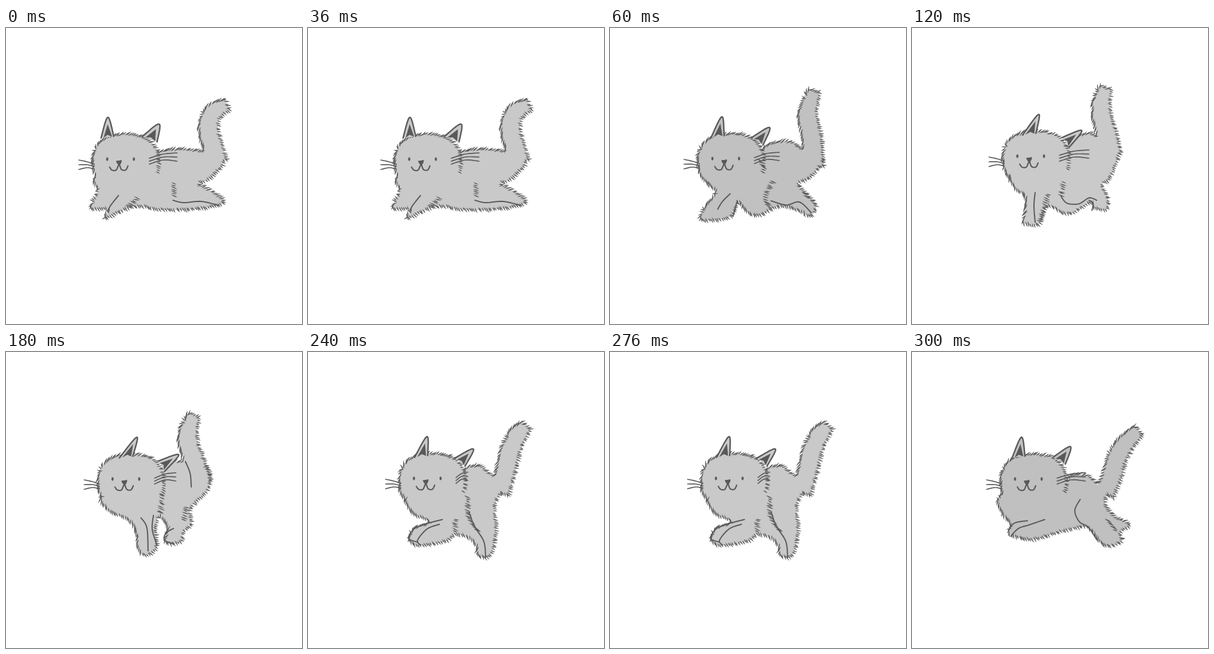
These frames come from a looping animation (500 by 500 pixels, 360 ms). An HTML page with a canvas:

```html
<!DOCTYPE html>
<html lang="en">
<head>
<meta charset="utf-8">
<title>Running cat</title>
<style>
html, body { margin: 0; width: 100%; height: 100%; overflow: hidden; background: #fff; }
canvas { display: block; width: 500px; height: 500px; }
</style>
</head>
<body>
<canvas id="stage" width="500" height="500"></canvas>
<script>
const ctx = document.getElementById('stage').getContext('2d');
const INK = '#595959', STEP = 60, TAIL_R = 16.5;

// Key poses of the run. The head follows from nose and turn, the fur from the outlines.
const poses = [
  {
    fill: '#c9c9c9', nose: [191, 227], turn: -19, reach: 47,
    tail: '358,228 348,196 342,168 350,143 374,129',
    torso: `225,215 262,207 300,204 340,211 368,226 345,254 326,263 342,272 368,290 360,299
      320,306 265,307 222,301 195,309 166,322 172,306 143,304 155,273 152,250`,
    lines: ['282,291 300,295 330,293 360,300', '190,283 178,298 172,308'],
    tufts: ['284,262 284,287', '222,288 205,303']
  },
  {
    fill: '#c1c1c1', nose: [193, 226], turn: -4, reach: 42,
    tail: '345,235 342,195 337,165 334,140 345,106',
    torso: `250,210 266,198 290,191 312,194 334,214 360,222 338,253 318,263 335,283 348,300 338,318
      318,308 286,301 250,317 230,309 216,294 203,319 156,325 156,308 178,278 170,255`,
    lines: ['272,292 298,299 320,294 340,312', '203,280 190,293 182,306', '215,292 208,318'],
    tufts: ['275,260 263,284 270,306', '254,224 262,240', '328,278 336,288']
  },
  {
    fill: '#cacaca', nose: [198, 222], turn: 16, reach: 50,
    tail: '338,215 328,175 321,150 320,125 327,100',
    torso: `250,210 270,190 300,177 324,195 350,205 335,253 322,265 332,290 328,307 309,304
      301,295 265,314 229,301 217,329 208,333 188,328 192,305 190,284 172,268 170,240`,
    lines: ['208,278 206,300 208,328', '252,285 262,296 282,297 299,287 312,291', '299,291 306,297 304,308'],
    tufts: ['257,262 251,284', '230,281 217,326']
  },
  {
    fill: '#cacaca', nose: [200, 220], turn: 21, reach: 36,
    tail: '332,222 317,180 308,155 309,130 317,106',
    torso: `250,215 270,190 300,184 335,190 345,212 340,235 312,264 314,291 300,304 296,321
      269,322 273,296 259,277 253,300 255,330 238,343 225,336 219,302 205,282 172,267 165,240`,
    lines: ['228,280 238,297 240,336', '249,276 247,300 255,326', '283,298 270,306 268,318 283,324', '313,228 311,205 303,185'],
    tufts: ['264,240 261,275', '305,262 300,284']
  },
  {
    fill: '#c9c9c9', nose: [199, 219], turn: 2, reach: 20,
    tail: '323,238 334,200 342,167 353,142 369,124',
    torso: `250,210 270,195 292,193 318,215 334,226 316,257 318,303 308,344 287,344 284,328
      272,314 248,308 235,319 190,327 171,318 179,298 205,287 176,271 170,240`,
    lines: ['227,283 200,290 179,299 170,315 185,321', '222,291 201,299 185,318 190,326', '272,270 281,294 297,320 300,347'],
    tufts: ['270,246 272,280 288,304', '250,282 248,306']
  },
  {
    fill: '#c0c0c0', nose: [194, 220], turn: -9, reach: 48,
    tail: '325,240 339,205 346,180 360,156 383,132',
    torso: `250,220 270,208 298,209 320,230 340,228 326,252 342,277 368,291 352,305 354,320
      325,327 298,297 265,300 230,310 200,317 165,308 166,290 153,273 152,240`,
    lines: ['224,283 198,292 180,298 167,311', '163,301 173,289 195,285', '284,249 275,268 283,287 298,296 312,317'],
    tufts: ['330,284 345,302']
  }
];

const parse = text => text.trim().split(/\s+/).map(p => p.split(',').map(Number));

function seeded(seed) {
  return () => (seed = (seed * 16807) % 2147483647) / 2147483647;
}

// Catmull-Rom curve as a dense list of points
function smooth(pts, closed) {
  const n = pts.length, out = [];
  const at = i => closed ? pts[(i + n) % n] : pts[Math.max(0, Math.min(n - 1, i))];
  const spline = (a, b, c, d, t) =>
    b + t * (c - a + t * (2 * a - 5 * b + 4 * c - d + t * (3 * (b - c) + d - a))) / 2;
  for (let i = 0; i < (closed ? n : n - 1); i++)
    for (let t = 0; t < 1; t += 0.125)
      out.push([0, 1].map(k => spline(at(i - 1)[k], at(i)[k], at(i + 1)[k], at(i + 2)[k], t)));
  if (!closed) out.push(pts[n - 1]);
  return out;
}

// calls fn(x, y, normalX, normalY) at even steps along a list of points
function walk(pts, gap, fn) {
  let rest = 0;
  for (let i = 1; i < pts.length; i++) {
    const [x, y] = pts[i - 1], dx = pts[i][0] - x, dy = pts[i][1] - y, d = Math.hypot(dx, dy);
    for (; rest < d; rest += gap) fn(x + dx * rest / d, y + dy * rest / d, dy / d, -dx / d);
    rest -= d;
  }
}

function headShape([nx, ny]) {
  const pts = [], round = v => Math.sign(v) * Math.abs(v) ** 0.85;
  for (let i = 0; i < 72; i++) {
    const a = i / 36 * Math.PI;
    pts.push([nx + 11 + 56 * round(Math.cos(a)), ny - 1 + 47 * round(Math.sin(a))]);
  }
  return pts;
}

function tailShape(text) {
  const spine = smooth(parse(text)), left = [], right = [];
  spine.forEach(([x, y], i) => {
    const p = spine[Math.max(0, i - 1)], q = spine[Math.min(spine.length - 1, i + 1)];
    const len = Math.hypot(q[0] - p[0], q[1] - p[1]), r = TAIL_R * (1 - 0.5 * (i / spine.length) ** 5);
    const nx = (q[1] - p[1]) / len * r, ny = (p[0] - q[0]) / len * r;
    left.push([x + nx, y + ny]);
    right.unshift([x - nx, y - ny]);
  });
  return left.concat(right);
}

function pathOf(pts, closed) {
  const path = new Path2D();
  pts.forEach(p => path.lineTo(...p));
  if (closed) path.closePath();
  return path;
}

function line(pts, width) {
  ctx.lineWidth = width;
  ctx.stroke(pathOf(smooth(pts)));
}

// one tapered brush stroke
function hair(x, y, dx, dy, len, bend) {
  const x0 = x - dx * len * 0.5, y0 = y - dy * len * 0.5;
  const ctrl = k => [x - dy * k, y + dx * k];
  ctx.beginPath();
  ctx.moveTo(x0, y0);
  ctx.quadraticCurveTo(...ctrl(bend + 1.8), x0 + dx * len, y0 + dy * len);
  ctx.quadraticCurveTo(...ctrl(bend - 1.8), x0, y0);
  ctx.fill();
}

// hair stands off the outline and is swept back and down by the run
function tuft(x, y, nx, ny, rnd) {
  const angle = Math.atan2(ny + 0.4, nx + 0.8) + (rnd() - 0.5) * 0.4;
  const dx = Math.cos(angle), dy = Math.sin(angle);
  const flat = 1 - Math.abs(dx * nx + dy * ny);
  hair(x + rnd() * 2 - 1, y + rnd() * 2 - 1, dx, dy, (9 + 6 * flat) * (0.7 + rnd() * 0.5), rnd() * 3 - 1.5);
}

function ear(a, tip, b, fill) {
  const mid = [(a[0] + b[0]) / 2, (a[1] + b[1]) / 2];
  const mix = (p, q, k) => [p[0] + (q[0] - p[0]) * k, p[1] + (q[1] - p[1]) * k];
  const bow = p => mix(mix(p, tip, 0.65), mid, -0.16);
  const path = pathOf(smooth([a, bow(a), tip, bow(b), b]));
  ctx.fillStyle = fill;
  ctx.fill(path);
  ctx.lineWidth = 2.4;
  ctx.stroke(path);
  ctx.fillStyle = INK;
  ctx.fill(pathOf([mix(a, mid, 0.4), mix(mid, tip, 0.66), mix(b, mid, 0.25), mix(mid, tip, 0.12)]));
}

function face({ nose: [x, y], turn: t, reach, fill }) {
  const at = (dx, dy) => [x + dx, y + dy];
  ear(at(-20 + 0.55 * t, -41), at(t, -76), at(2 + 0.58 * t, -44), fill);
  ear(at(48 + 0.45 * t, -40 + 0.2 * t), at(79 + 0.6 * t, -56 + 0.45 * t), at(66 + 0.1 * t, -27 + 0.4 * t), fill);
  for (const dx of [-20, 25]) {
    ctx.beginPath();
    ctx.ellipse(x + dx, y - 5.5, 1.8, 3, 0, 0, Math.PI * 2);
    ctx.fill();
  }
  ctx.fill(pathOf(smooth([at(-5, -2), at(0, -3), at(4, -4), at(4, 0), at(0, 5)], true), true));
  line([at(-16, 8), at(-12, 13), at(-5, 13), at(0, 4), at(4, 12), at(11, 13), at(15, 6)], 2.2);
  for (const k of [-1, 0, 1]) {
    line([at(-42, 7 + k * 4), at(-54, 4 + k * 5), at(-68, 4 + k * 8)], 1.7);
    line([at(51, k * 5 - 2), at(51 + reach / 2, k * 5 - 9), at(51 + reach, k * 7 - 9)], 1.7);
  }
}

function draw(index) {
  const pose = poses[index], rnd = seeded(977 + index * 131);
  const head = headShape(pose.nose);
  const parts = [head, tailShape(pose.tail), smooth(parse(pose.torso), true)];
  const paths = parts.map(p => pathOf(p, true));

  ctx.fillStyle = '#fff';
  ctx.fillRect(0, 0, 500, 500);
  ctx.lineCap = ctx.lineJoin = 'round';
  ctx.strokeStyle = INK;
  ctx.fillStyle = pose.fill;
  paths.forEach(p => ctx.fill(p));

  ctx.fillStyle = INK;
  parts.forEach((part, i) => walk(part.concat([part[0]]), 3.6, (x, y, nx, ny) => {
    const hidden = paths.some((p, j) => j !== i && ctx.isPointInPath(p, x + nx * 2, y + ny * 2));
    const cheek = part === head && nx > 0.6 && ny < 0.35;
    if (!hidden || cheek) tuft(x, y, nx, ny, rnd);
  }));
  pose.tufts.forEach(t => walk(smooth(parse(t)), 3.6, (x, y) => tuft(x, y, 0.5, 0.1, rnd)));
  pose.lines.forEach(l => line(parse(l), 2));
  face(pose);
}

let shown = -1;
function tick() {
  const index = Math.floor(performance.now() / STEP) % poses.length;
  if (index !== shown) draw(shown = index);
  requestAnimationFrame(tick);
}
tick();
</script>
</body>
</html>
```
